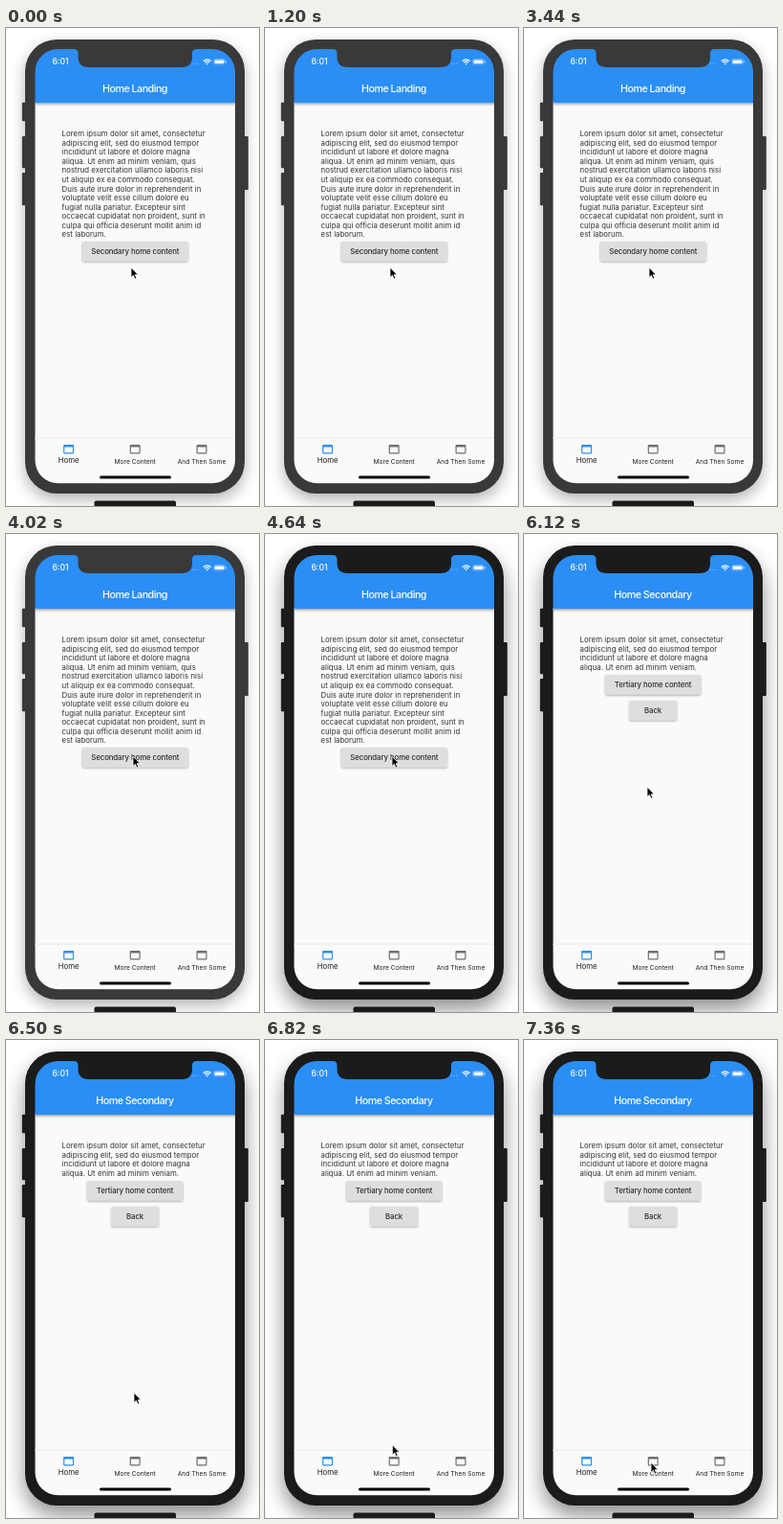
Write an HTML page that moves like this. It is 265 by 499 pixels and loops after 8000 ms.

```html
<!DOCTYPE html>
<html lang="en">
<head>
<meta charset="utf-8">
<title>Tab navigation</title>
<style>
html, body { margin: 0; width: 100%; height: 100%; overflow: hidden; background: #fff; }
svg { display: block; width: 100vw; height: 100vh; }
text { font-family: Inter, Roboto, sans-serif; fill: #1f1f1f; }
.title { font-size: 10.7px; font-weight: 500; letter-spacing: -.5px; fill: #fff; text-anchor: middle; }
.body { font-size: 7.8px; letter-spacing: .04px; fill: #333; }
.label { font-size: 7.8px; font-weight: 500; letter-spacing: -.08px; fill: #2b2b2b; text-anchor: middle; }
.tab { font-size: 6.7px; text-anchor: middle; }
.tab.on { font-size: 7.8px; }
.clock { font-size: 8.6px; font-weight: 500; fill: #fff; text-anchor: middle; }
</style>
</head>
<body>
<svg viewBox="0 0 265 499" xmlns="http://www.w3.org/2000/svg">
  <defs>
    <clipPath id="screen"><rect x="30.5" y="22" width="209.5" height="453.3" rx="24"/></clipPath>
    <filter id="wide" x="-30%" y="-20%" width="160%" height="140%"><feGaussianBlur stdDeviation="11"/></filter>
    <filter id="soft" x="-20%" y="-20%" width="140%" height="140%"><feGaussianBlur stdDeviation="8"/></filter>
    <filter id="lift" x="-10%" y="-30%" width="120%" height="170%"><feDropShadow dx="0" dy="1" stdDeviation=".8" flood-opacity=".38"/></filter>
    <filter id="barLift" x="-5%" y="-10%" width="110%" height="130%"><feDropShadow dx="0" dy="1.3" stdDeviation="1.6" flood-opacity=".4"/></filter>
  </defs>
  <rect width="265" height="499" fill="#fff"/>
  <rect id="idleShadow" x="20" y="18" width="230" height="474" rx="33" opacity=".3" filter="url(#soft)"/>
  <rect id="focusShadow" x="20" y="24" width="230" height="472" rx="33" opacity=".45" filter="url(#wide)"/>
  <g id="shell">
    <rect x="16.8" y="77.7" width="6" height="19.5" rx="1"/>
    <rect x="16.8" y="113" width="6" height="33.3" rx="1"/>
    <rect x="16.8" y="151" width="6" height="34.3" rx="1"/>
    <rect x="247" y="113" width="6.8" height="56" rx="1"/>
    <rect x="20" y="12" width="230" height="474" rx="33"/>
  </g>
  <g clip-path="url(#screen)">
    <g id="first"></g>
    <g id="second"></g>
    <rect x="30" y="428" width="211" height="48" fill="#fafafa"/>
    <rect x="30" y="427.7" width="211" height=".7" fill="#e2e2e2"/>
    <g id="tabs"></g>
    <rect x="98" y="467.5" width="75" height="3" rx="1.5" fill="#000"/>
    <text class="clock" x="57" y="38.4">6:01</text>
    <g fill="#fff">
      <g opacity=".35">
        <circle cx="195.5" cy="37.2" r=".7"/><circle cx="198.2" cy="37.2" r=".7"/><circle cx="200.9" cy="37.2" r=".7"/>
      </g>
      <g fill="none" stroke="#fff" stroke-width="1.2">
        <path d="M206.7 34.5q4-3.4 8 0"/>
        <path d="M208.2 36.1q2.5-2 5 0"/>
      </g>
      <path d="M209.5 37.2q1.2-.8 2.4 0l-1.2 1.3z"/>
      <rect x="217.8" y="32.6" width="11.4" height="5.4" rx="1.5" fill="none" stroke="#fff" stroke-width=".6" opacity=".6"/>
      <rect x="218.7" y="33.5" width="9.6" height="3.6" rx=".8"/>
      <rect x="229.9" y="34.3" width=".8" height="2" rx=".4"/>
    </g>
  </g>
  <path id="notch" d="M71 21h128.500v1q-4.500 0-4.500 4.500v3.500q0 11-11 11h-97.500q-11 0-11-11v-3.500q0-4.500-4.500-4.500z"/>
  <rect id="dock" x="92.5" y="493.5" width="85.5" height="12" rx="2" fill="#1b1b1b"/>
  <path id="cursor" d="M0 0V10.4L2.4 8.2L4 12L5.8 11.2L4.2 7.6H7.4Z" fill="#000" stroke="#fff" stroke-width=".8" stroke-linejoin="round"/>
</svg>
<script>
const LOOP = 8000, FOCUS = 4640, PUSH = 4820, PUSH_TIME = 400, WIDTH = 210;
const $ = id => document.getElementById(id);

const landing = `Lorem ipsum dolor sit amet, consectetur
adipiscing elit, sed do eiusmod tempor
incididunt ut labore et dolore magna
aliqua. Ut enim ad minim veniam, quis
nostrud exercitation ullamco laboris nisi
ut aliquip ex ea commodo consequat.
Duis aute irure dolor in reprehenderit in
voluptate velit esse cillum dolore eu
fugiat nulla pariatur. Excepteur sint
occaecat cupidatat non proident, sunt in
culpa qui officia deserunt mollit anim id
est laborum.`;
const secondary = landing.split('\n').slice(0, 3).join('\n') + '\naliqua. Ut enim ad minim veniam.';

const button = (x, y, w, label) => `
  <rect x="${x}" y="${y}" width="${w}" height="20.2" rx="1.2" fill="#dedede" filter="url(#lift)"/>
  <text class="label" x="${x + w / 2}" y="${y + 12.9}">${label}</text>`;

const page = (title, copy, buttons) => `
  <rect x="30" y="77" width="211" height="352" fill="#fafafa"/>
  <rect x="30" y="21" width="211" height="57" fill="#2c8ef5" filter="url(#barLift)"/>
  <text class="title" x="135" y="66.7">${title}</text>
  ${copy.split('\n').map((s, i) => `<text class="body" x="58.6" y="${113.4 + i * 9.52}">${s}</text>`).join('')}
  ${buttons}`;

const tab = (x, label, on) => `
  <path fill-rule="evenodd" fill="${on ? '#2c8ef5' : '#6f6f6f'}"
    d="M${x - 4.4} 435h8.8q1.1 0 1.1 1.1v7.2q0 1.1-1.1 1.1h-8.8q-1.1 0-1.1-1.1v-7.2q0-1.1 1.1-1.1zM${x - 4.3} 437.5v5.7h8.6v-5.7z"/>
  <text class="tab${on ? ' on' : ''}" x="${x}" y="${on ? 453.6 : 454.7}">${label}</text>`;

$('first').innerHTML = page('Home Landing', landing, button(80, 223, 110.6, 'Secondary home content'));
$('second').innerHTML = page('Home Secondary', secondary,
  button(85.2, 147.3, 99.8, 'Tertiary home content') + button(110.5, 174, 49.2, 'Back'));
$('tabs').innerHTML = tab(65.6, 'Home', true) + tab(135.2, 'More Content') + tab(205, 'And Then Some');

// time, x, y of the pointer tip
const path = [
  [0, 131, 250], [3440, 131, 250], [4020, 133, 232], [5480, 133, 232],
  [6120, 129, 264], [6300, 130, 314], [6500, 134, 368], [7060, 133, 441], [LOOP, 133, 441]
];

function slope(i, k) {
  const a = path[i - 1], b = path[i], c = path[i + 1];
  if (!a || !c) return 0;
  const s = (b[k] - a[k]) / (b[0] - a[0]), r = (c[k] - b[k]) / (c[0] - b[0]);
  return s * r > 0 ? 2 * s * r / (s + r) : 0;
}

function along(t, k) {
  let i = 0;
  while (i < path.length - 2 && t >= path[i + 1][0]) i++;
  const a = path[i], b = path[i + 1], d = b[0] - a[0], u = (t - a[0]) / d, v = 1 - u;
  return a[k] * (1 + 2 * u) * v * v + slope(i, k) * d * u * v * v
    + b[k] * u * u * (3 - 2 * u) - slope(i + 1, k) * d * u * u * v;
}

const move = (id, x, y = 0) => $(id).setAttribute('transform', `translate(${x.toFixed(2)} ${y.toFixed(2)})`);
const show = (id, on) => $(id).setAttribute('visibility', on ? 'visible' : 'hidden');

function draw(t) {
  const focused = t >= FOCUS, body = focused ? '#1b1b1b' : '#393939';
  $('shell').setAttribute('fill', body);
  $('notch').setAttribute('fill', body);
  show('idleShadow', !focused);
  show('focusShadow', focused);

  const u = Math.min(1, Math.max(0, (t - PUSH) / PUSH_TIME));
  const p = 1 - (1 - u) ** 3;
  move('first', -WIDTH / 3 * p);
  move('second', WIDTH * (1 - p));
  show('first', u < 1);
  show('second', u > 0);
  move('cursor', along(t, 1), along(t, 2));
}

function tick() {
  draw(performance.now() % LOOP);
  requestAnimationFrame(tick);
}
tick();
</script>
</body>
</html>
```
